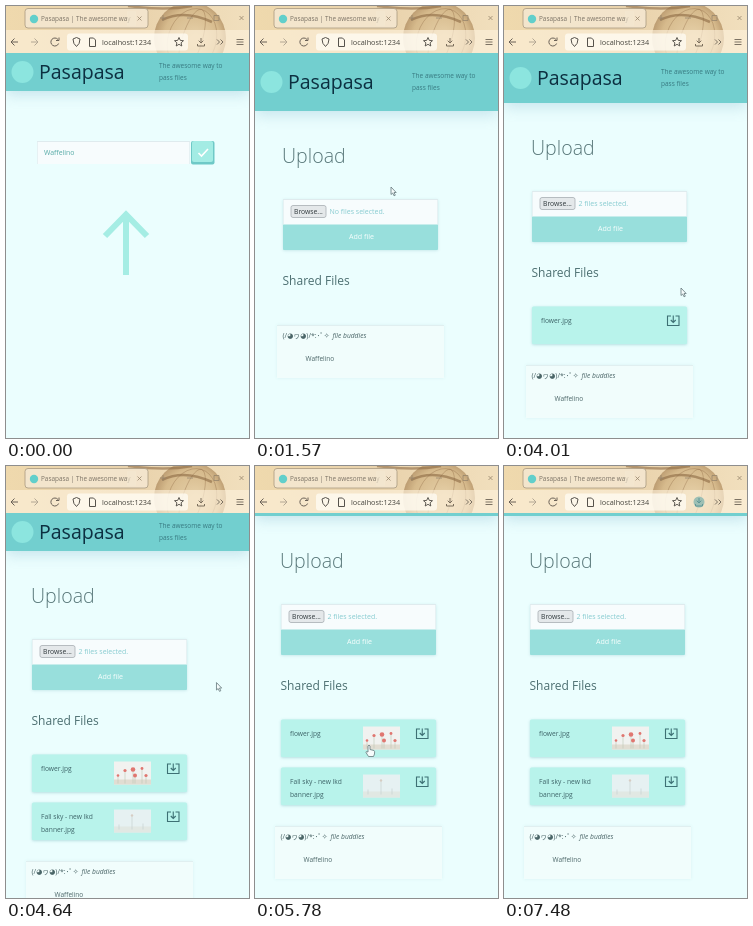
Recreate the animation shown at these times as an HTML page with a canvas. Size 243x432 px, loop 7.52 s.

```html
<!DOCTYPE html>
<html lang="en">
<head>
<meta charset="utf-8">
<title>File sharing demo</title>
<style>
html, body { margin: 0; width: 100%; height: 100%; overflow: hidden; background: #ebfefe; }
canvas { display: block; width: 243px; height: 432px; }
</style>
</head>
<body>
<canvas></canvas>
<script>
const LOOP = 7520, W = 243, H = 432, BAR = 47;
const canvas = document.querySelector('canvas');
const c = canvas.getContext('2d');
const dpr = window.devicePixelRatio || 1;
canvas.width = W * dpr;
canvas.height = H * dpr;

const TIMES = { signIn: 1000, picked: 2400, file1: 3600, file2: 4090, thumb1: 4400, thumb2: 4600, scroll: 5120, download: 6350 };
const USER = 'Waffelino';
const TEAL = '#72cfcf', MINT = '#b8f3eb', INK = '#4b6668';

// Pointer path: time, x, y, 1 for the hand shape
const POINTER = [
  [330, 150, 230, 0], [700, 190, 147, 1], [1000, 190, 147, 0], [1400, 136, 181, 0],
  [1910, 136, 181, 0], [2150, 54, 204, 0], [2500, 54, 204, 0], [2700, 96, 230, 1],
  [2900, 96, 230, 1], [3040, 98, 254, 1], [3080, 104, 260, 0], [3380, 177, 282, 0],
  [4300, 177, 282, 0], [4800, 221, 196, 0], [5400, 221, 196, 0], [5740, 114, 279, 1],
  [5950, 114, 279, 1], [6200, 165, 265, 1], [6600, 165, 265, 1], [6850, 165, 313, 1],
  [7080, 165, 313, 0], [7240, 193, 38, 0]
];

const ease = u => { u = Math.min(1, Math.max(0, u)); return u * u * (3 - 2 * u); };

function rect(x, y, w, h, fill, radius = 0, border) {
  c.beginPath();
  c.roundRect(x, y, w, h, radius);
  c.fillStyle = fill;
  c.fill();
  if (border) { c.strokeStyle = border; c.lineWidth = 0.8; c.stroke(); }
}

function disc(x, y, r, fill) {
  c.beginPath();
  c.arc(x, y, r, 0, 7);
  c.fillStyle = fill;
  c.fill();
}

function shadowed(color, blur, dy, draw) {
  c.save();
  c.shadowColor = color;
  c.shadowBlur = blur * dpr;
  c.shadowOffsetY = dy * dpr;
  draw();
  c.restore();
}

function line(d, color, width = 1) {
  c.strokeStyle = color;
  c.lineWidth = width;
  c.stroke(new Path2D(d));
}

function text(s, x, y, size, color, style = '') {
  c.font = `${style} ${size}px "Open Sans", "Noto Sans", "DejaVu Sans", "Noto Sans CJK JP", sans-serif`;
  c.fillStyle = color;
  c.fillText(s, x, y + size * 0.35);
}

function field(x, y, w, h) {
  rect(x, y, w, h, '#f7fcfd', 1);
  line(`M${x} ${y + .5}H${x + w}`, '#dfebee', 1);
  line(`M${x + .5} ${y + h}V${y + 1}M${x + w - .5} ${y + 1}V${y + h}`, '#e6f1f3', 1);
}

function header(height, scroll, tagX) {
  const top = BAR - scroll, mid = top + height / 2;
  shadowed('rgba(110,170,195,.3)', 14, 4, () => rect(0, top, W, height, TEAL));
  disc(16.5, mid, 11, '#8ce5df');
  text('Pasapasa', 33, mid + .6, 19.5, '#0c2f40');
  text('The awesome way to', tagX, mid - 6.5, 6.5, '#387a81');
  text('pass files', tagX, mid + 6, 6.5, '#387a81');
}

function welcome(t) {
  header(38, 0, 153);
  field(31, 135, 153, 23);
  text(USER, 38, 147, 6.9, '#55aaa6');
  const pressed = t > 850 ? 1 : 0;
  rect(185, 135, 23.5, 23.5, '#6fc9c7', 2);
  rect(186, 135 + pressed, 21, 21, '#a3ece4', 2);
  line('M192.500 147l3 3 6.500 -7', '#fff', 1.6);
  line('M120 269V209M99 230L120 208.500L141 230', '#a5ede4', 6);
}

function downloadIcon(x, y) {
  line(`M${x + 3.500} ${y}H${x}V${y + 9.500}H${x + 11.500}V${y}H${x + 8}M${x + 5.750} ${y - .5}V${y + 6.500}M${x + 3.250} ${y + 4}l2.500 2.500 2.500 -2.500`, '#3d7074', 1.1);
}

function poppies(x, y) {
  rect(x, y, 37, 23, '#f1f2f0');
  rect(x, y + 18, 37, 5, '#e1ddd2');
  for (const [dx, dy, r] of [[4, 14, 1.3], [11, 9, 1.6], [19, 8, 2.3], [21, 14, 2], [28, 7, 1.4], [32, 14, 1.6]]) {
    line(`M${x + dx} ${y + dy}V${y + 22}`, '#bcc8b6', .6);
    disc(x + dx, y + dy, r, '#e07670');
  }
}

function sky(x, y) {
  rect(x, y, 37, 23, '#e6f1f2');
  rect(x, y + 17, 37, 6, '#e1e8e3');
  line(`M${x + 18} ${y + 7}V${y + 20}M${x + 5} ${y + 15}V${y + 20}M${x + 29} ${y + 14}V${y + 20}`, '#c6d2d1', .7);
  disc(x + 18, y + 6, 1.2, '#d6cdc3');
}

function card(x, y, lines, thumb) {
  shadowed('rgba(80,170,175,.4)', 3, .8, () => rect(x, y, 155, 37.5, MINT, 1.5));
  lines.forEach((s, i) => text(s, x + 9, y + 14 + 13 * i, 6.7, '#3d6468'));
  if (thumb) thumb(x + 82, y + 7);
  downloadIcon(x + 135.5, y + 9.5);
}

function sharing(t) {
  const files = (t >= TIMES.file1) + (t >= TIMES.file2);
  const height = [58, 50, 38][files];
  const scroll = 35 * ease((t - TIMES.scroll) / 220);
  const x = files > 1 ? 26 : 28;
  const y = BAR + height - scroll;
  header(height, scroll, files > 1 ? 153 : 157);

  text('Upload', x - 1, y + 45.3, 19.6, '#587779', '300');
  shadowed('rgba(110,175,185,.3)', 3, .8, () => rect(x, y + 88, 155, 51, '#98dfdc', 1));
  field(x, y + 88, 155, 25.5);
  rect(x + 8, y + 94.5, 35, 12, '#e4e8ea', 2, '#a9afb4');
  text('Browse...', x + 11, y + 100.5, 6.8, '#30393c');
  text(t < TIMES.picked ? 'No files selected.' : '2 files selected.', x + 46.5, y + 100.5, 7, '#86cbd0');
  text('Add file', x + 66, y + 126, 7.1, '#fafffe');

  text('Shared Files', x - .5, y + 169.3, 12, '#4c6f71');
  if (files > 0) card(x, y + 203.5, ['flower.jpg'], t >= TIMES.thumb1 && poppies);
  if (files > 1) card(x, y + 251.5, ['Fall sky - new lkd', 'banner.jpg'], t >= TIMES.thumb2 && sky);

  const box = y + 214 + 48 * files;
  shadowed('rgba(140,195,200,.2)', 3, 0, () => rect(x - 6, box, 167, 53, '#f1fdfc'));
  line(`M${x - 6} ${box + .5}H${x + 161}`, '#e0eff0', 1);
  text('(/◕ヮ◕)/*:･ﾟ✧', x - .5, box + 11, 7, INK);
  text('file buddies', x + 49.5, box + 11, 6.7, INK, 'italic');
  text(USER, x + 22.500, box + 33.500, 6.5, INK);
}

function globe() {
  c.save();
  c.beginPath();
  c.rect(0, 0, W, BAR);
  c.clip();
  const ball = c.createRadialGradient(190, 34, 4, 184, 30, 38);
  ball.addColorStop(0, '#e6d0a8');
  ball.addColorStop(.7, '#d6ba8c');
  ball.addColorStop(1, '#b5946a');
  disc(184, 32, 36, ball);
  c.strokeStyle = 'rgba(140,105,68,.45)';
  c.lineWidth = .8;
  for (const r of [10, 24]) {
    c.beginPath();
    c.ellipse(186, 34, r, 32, .3, 0, 7);
    c.stroke();
  }
  line('M122 0Q160 5 186 0M156 14Q178 3 206 16', 'rgba(140,105,68,.6)', 2.5);
  c.restore();
}

function browserBar(t) {
  const paper = c.createLinearGradient(0, 0, W, 0);
  paper.addColorStop(0, '#efd9ad');
  paper.addColorStop(.5, '#e9d2ab');
  paper.addColorStop(1, '#f1dfbd');
  rect(0, 0, W, BAR, paper);
  globe();

  rect(0, 24, W, 23, 'rgba(253,241,220,.65)');
  rect(19, 2.500, 123, 19.500, 'rgba(245,232,210,.85)', 3, '#a99a82');
  disc(28, 13, 4.2, '#62cfcb');
  text('Pasapasa | The awesome way', 35, 13, 6.4, '#7c7366');
  rect(121, 5, 9, 15, 'rgba(245,232,210,.65)');
  line('M131.500 10.500l4 4m0 -4l-4 4M157 9v6m-3 -3h6M181 12h6M208 9.500h5v5h-5zM233.500 10l4 4m0 -4l-4 4', '#97866d', .8);

  rect(61, 27.5, 121, 17, 'rgba(255,252,244,.75)', 3);
  line('M12 36H5m3.500 -3.500L5 36l3.500 3.500', '#6a6157', 1);
  line('M25 36h7m-3.500 -3.500L32 36l-3.500 3.500', '#b3a794', 1);
  line('M52 33.500a4 4 0 1 0 .6 4M53 31.500v3h-3', '#6a6157', 1);
  line('M67 33l3.500 -1.500 3.500 1.500q0 5 -3.500 7.500q-3.500 -2.500 -3.500 -7.500zM83.500 32h4l2 2v6.500h-6z', '#56524c', 1);
  text('localhost:1234', 96, 36, 7.3, '#45433c');
  line('M173 31.500l1.300 2.900 3.200 .3 -2.400 2.100 .7 3.200 -2.800 -1.700 -2.800 1.700 .7 -3.200 -2.400 -2.100 3.200 -.3z', '#4f4b45', .9);

  const loaded = t >= TIMES.download;
  if (loaded) disc(195, 36, 5.5, '#9dbfb4');
  line('M195 32v5m-2.300 -2.300l2.300 2.300 2.300 -2.300M191.500 38v2h7v-2', loaded ? '#5f9696' : '#7b6e5c', 1);
  line('M211 33.500l2.500 2.500 -2.500 2.500m3.500 -5l2.500 2.500 -2.500 2.500M230.500 33.500h7m-7 2.500h7m-7 2.500h7', '#6f6557', .9);
}

function pointer(t) {
  const i = POINTER.findIndex(k => k[0] > t);
  if (i < 1) return;
  const [t0, x0, y0, hand] = POINTER[i - 1], [t1, x1, y1] = POINTER[i];
  const u = ease((t - t0) / (t1 - t0));
  c.save();
  c.translate(x0 + (x1 - x0) * u, y0 + (y1 - y0) * u);
  const shape = new Path2D(hand
    ? 'M-1 1Q0 -1 1 1V4.500L5 5.500Q6 6 5.500 9L4.500 11.500H-.5L-3 7.500Q-3.500 6 -1 7z'
    : 'M0 0V7.500L1.700 6L3 8.800L4.300 8.200L3 5.500H5.200z');
  c.fillStyle = '#f6fcfc';
  c.fill(shape);
  c.strokeStyle = '#64787b';
  c.lineWidth = .8;
  c.stroke(shape);
  c.restore();
}

function draw(t) {
  c.setTransform(dpr, 0, 0, dpr, 0, 0);
  rect(0, 0, W, H, '#ebfefe');
  if (t < TIMES.signIn) welcome(t); else sharing(t);
  browserBar(t);
  pointer(t);
}

function tick() {
  draw(performance.now() % LOOP);
  requestAnimationFrame(tick);
}
tick();
</script>
</body>
</html>
```
